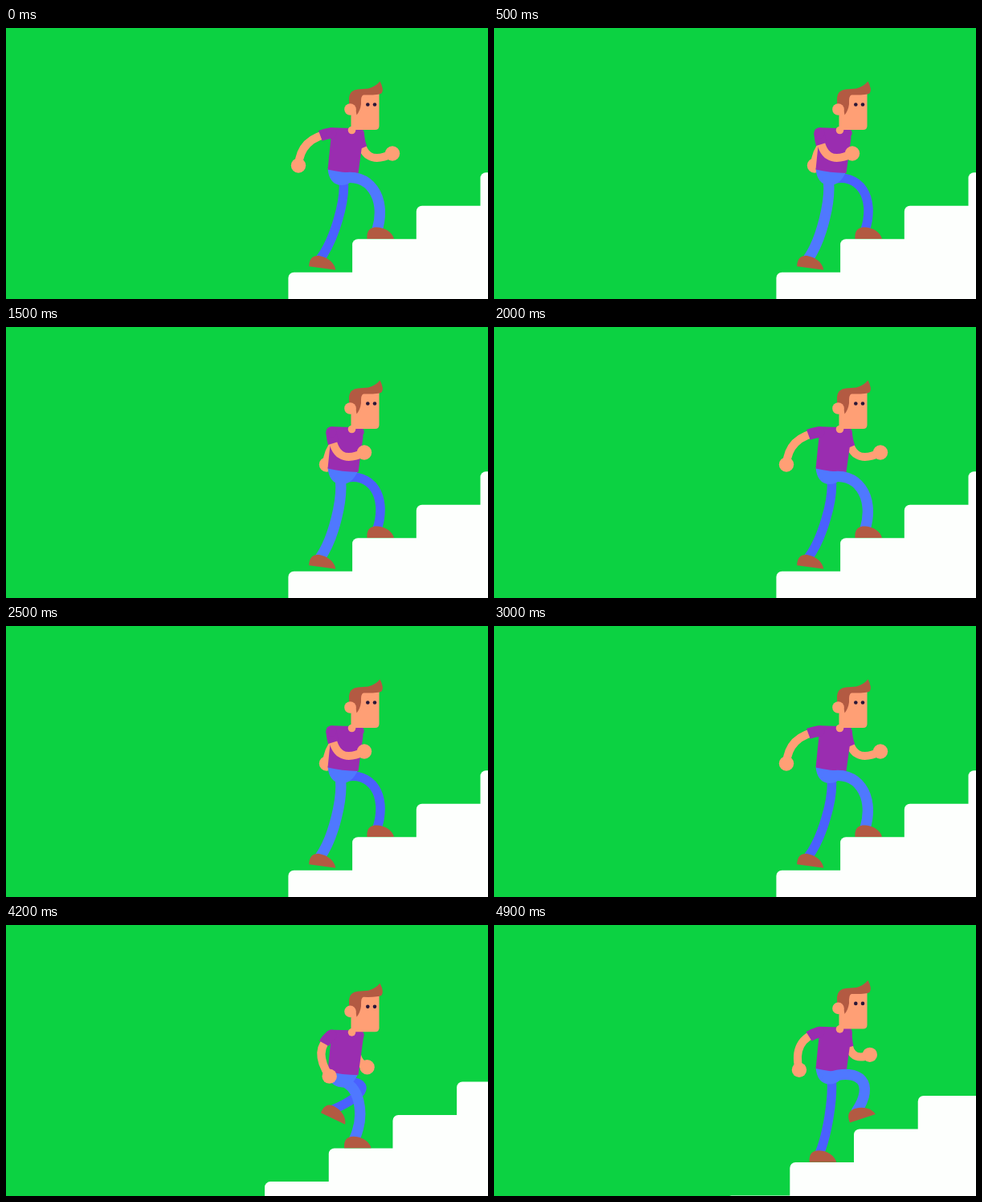
An HTML page for the animation above (5 s loop, 600 by 338 pixels).

```html
<!DOCTYPE html>
<html lang="en">
<head>
<meta charset="utf-8">
<title>Climbing stairs</title>
<style>
  html, body { margin: 0; width: 100%; height: 100%; overflow: hidden; background: #0cd242; }
  svg { display: block; width: 100vw; height: 100vh; }
  .limb { fill: none; stroke-linecap: round; }
  .sleeve { fill: none; stroke: #9a2db0; }
  .skin { fill: #ff9f75; }
  .brown { fill: #b35a42; }
  .shirt { fill: #9a2db0; }
</style>
</head>
<body>
<svg viewBox="0 0 600 338" preserveAspectRatio="none">
  <rect width="600" height="338" fill="#0cd242"/>
  <g id="stairs" fill="#fdfffd"></g>
  <g id="farArm"></g>
  <g id="farLeg"></g>
  <g id="torso">
    <path fill="#4f78ff" d="M400.5 175Q402 195 417 196Q430 197 438 180Z"/>
    <path class="shirt" d="M405 124.300L430 125Q444.500 126 444.500 137L438.500 181Q418 180.500 400.500 176.500L404.500 137L400 131Z"/>
  </g>
  <g id="nearLeg"></g>
  <g id="head">
    <circle class="skin" cx="430.500" cy="127.500" r="4.800"/>
    <path class="skin" d="M429.500 82H464.500V122Q464.500 127 459.500 127H429.500Z"/>
    <path class="brown" d="M427 98V87Q428 77.500 438 76.500L451 75.500Q460 73 465.500 66.500Q471 77 467.500 81.500Q463 84 445 83.500Q441.500 84 442 95Q441 103 436.500 108.500L435 100Z"/>
    <circle class="skin" cx="428.500" cy="101.500" r="7.300"/>
    <circle cx="450.300" cy="95.500" r="2.300" fill="#2a1738"/>
    <circle cx="459" cy="95.500" r="2.300" fill="#2a1738"/>
  </g>
  <g id="nearArm"></g>
</svg>
<script>
const NS = "http://www.w3.org/2000/svg";
const $ = id => document.getElementById(id);
const { sin, cos, floor, PI } = Math;
const CYCLE = 1000, HOLD = 100;
const STEP_X = 79.7, STEP_Y = 41.55;

const mix = (a, b, t) => a + (b - a) * t;
const smooth = t => t * t * (3 - 2 * t);
// cosine over the walk cycle, peaking at the given phase
const wave = (phase, peak = 0, times = 1) => cos(2 * PI * times * (phase - peak));
// share of one stair passed, a little slower in the middle
const climb = p => p - 0.035 * sin(PI * p) ** 2;

function add(parent, tag, attrs) {
  const el = document.createElementNS(NS, tag);
  for (const k in attrs) el.setAttribute(k, attrs[k]);
  return parent.appendChild(el);
}

// First half: the foot rides down on its stair. Second half: it swings up to the next one.
function footAt(phase) {
  if (phase < 0.5) {
    const p = phase * 2;
    return { x: 462 - 71 * p, y: 252 + STEP_Y * climb(p), turn: 0 };
  }
  const q = phase * 2 - 1;
  return {
    x: mix(391, 462, smooth(q ** 1.25)),
    y: mix(288, 252, q) - 46 * sin(PI * q),
    turn: 8 * (1 - q) + 21 * sin(2 * PI * q ** 1.6)
  };
}

// how far the middle of the leg bows away from the line between hip and ankle
const kneeAt = phase => ({
  x: 17 + 10.5 * wave(phase, 0.83) + 4.5 * wave(phase, 0.22, 2),
  y: -9 - 10 * wave(phase, 0.98)
});

const handAt = phase => ({
  x: 2 - 35 * wave(phase) - 2 * wave(phase, 0, 2) - 6 * wave(phase, 0, 3),
  y: 40 + 10.5 * wave(phase) - 7 * wave(phase, 0, 2) - 3 * wave(phase, 0, 3)
});

const elbowAt = phase => ({
  x: -17.5 - 21 * wave(phase),
  y: 25 - 19 * wave(phase)
});

function makeLeg(id, color, width, hipX, hipY) {
  const g = $(id);
  const limb = add(g, "path", { class: "limb", stroke: color, "stroke-width": width });
  const shoe = add(g, "path", {
    class: "brown", d: "M-12.5 11C-13.5 -1 -7 -4 0 -3.5C10 -3 19 3 21 11Z"
  });
  return (phase, dy) => {
    const foot = footAt(phase), knee = kneeAt(phase), top = hipY + dy;
    const handle = t =>
      `${mix(hipX, foot.x, t) + knee.x * 4 / 3} ${mix(top, foot.y, t) + knee.y * 4 / 3}`;
    limb.setAttribute("d",
      `M${hipX} ${top}C${handle(0.25)} ${handle(0.75)} ${foot.x} ${foot.y}`);
    shoe.setAttribute("transform", `translate(${foot.x} ${foot.y}) rotate(${foot.turn})`);
  };
}

function makeArm(id, x, cuff, width) {
  const g = $(id), y = 131;
  const limb = add(g, "path", { class: "limb", stroke: "#ff9f75", "stroke-width": 10 });
  const palm = add(g, "circle", { class: "skin", r: 9.2 });
  const sleeve = add(g, "path", {
    class: "sleeve", "stroke-width": width, "stroke-dasharray": `${cuff} 300`
  });
  add(g, "circle", { class: "shirt", cx: x, cy: y, r: width / 2 });
  return (phase, dy) => {
    const hand = handAt(phase), elbow = elbowAt(phase);
    const d = `M${x} ${y}q${elbow.x} ${elbow.y} ${hand.x} ${hand.y}`;
    limb.setAttribute("d", d);
    sleeve.setAttribute("d", d);
    palm.setAttribute("cx", x + hand.x);
    palm.setAttribute("cy", y + hand.y);
    g.setAttribute("transform", `translate(0 ${dy})`);
  };
}

for (let i = -1; i < 6; i++) {
  add($("stairs"), "rect", {
    x: 351.4 + i * STEP_X, y: 304.8 - i * STEP_Y, width: 800, height: 500, rx: 7
  });
}

const farArm = makeArm("farArm", 440, 19, 11.5);
const farLeg = makeLeg("farLeg", "#4a60ff", 11.5, 420, 189);
const nearLeg = makeLeg("nearLeg", "#4f78ff", 13.3, 416, 188);
const nearArm = makeArm("nearArm", 405, 14, 13.5);

function draw(ms) {
  const phase = floor(ms / HOLD) * HOLD % CYCLE / CYCLE;
  const other = (phase + 0.5) % 1;
  const dy = 3.5 * (1 - wave(phase, 0, 2));
  const p = climb(phase * 2 % 1);
  $("stairs").setAttribute("transform", `translate(${-p * STEP_X} ${p * STEP_Y})`);
  for (const id of ["torso", "head"]) $(id).setAttribute("transform", `translate(0 ${dy})`);
  nearLeg(phase, dy);
  farLeg(other, dy);
  nearArm(phase, dy);
  farArm(other, dy);
}

const start = performance.now();
function tick() {
  draw((performance.now() - start) % 5000);
  requestAnimationFrame(tick);
}
tick();
</script>
</body>
</html>
```
